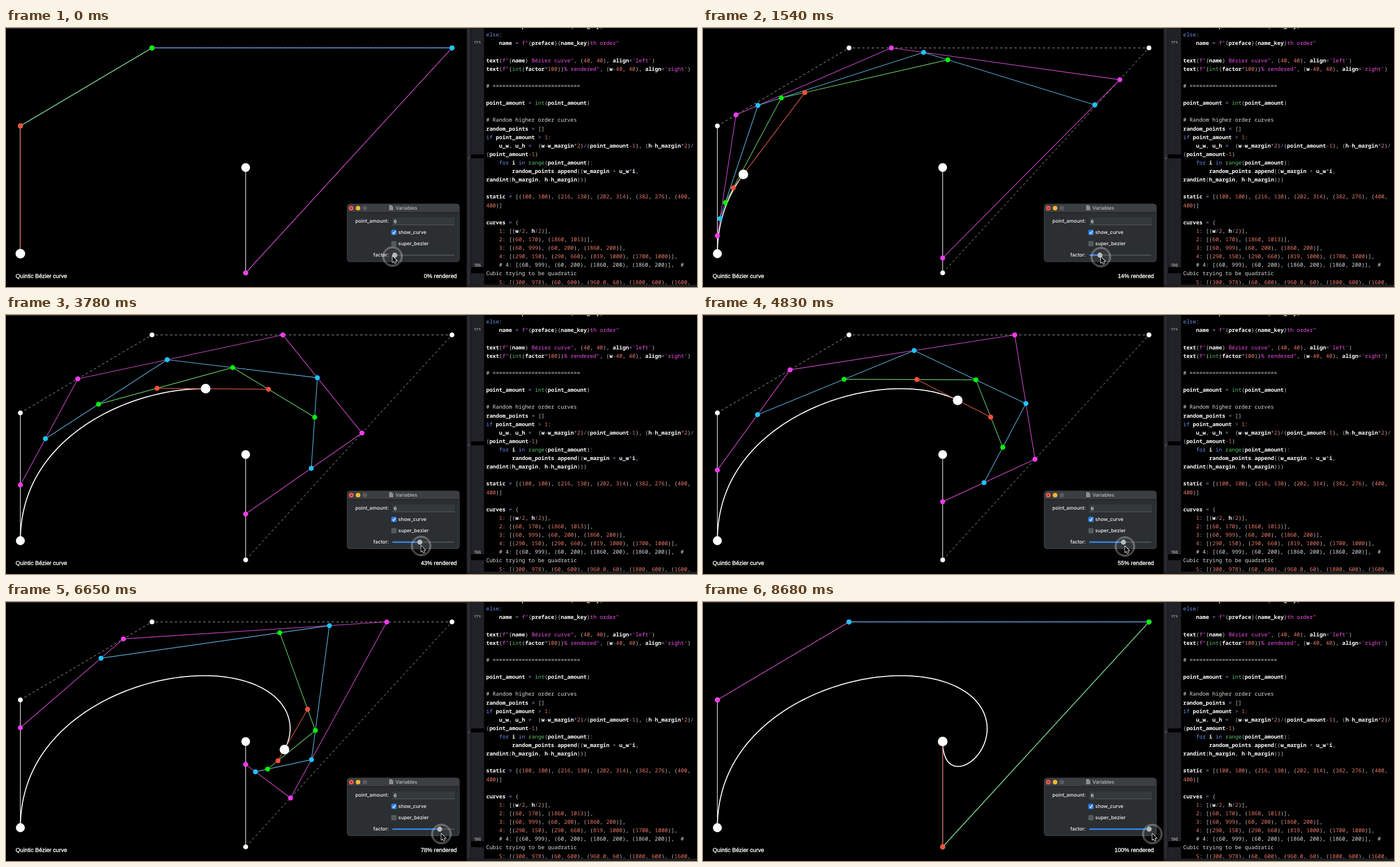
Animation, 1221 px wide and 459 px high, one loop 8.75 s. Source, as an HTML page with a canvas:

```html
<!DOCTYPE html>
<html lang="en">
<head>
<meta charset="utf-8">
<title>Bézier construction</title>
<style>
html, body { margin: 0; width: 100%; height: 100%; overflow: hidden; background: #000; }
canvas { display: block; width: 1221px; height: 459px; }
</style>
</head>
<body>
<canvas id="stage" width="1221" height="459"></canvas>
<script>
const ctx = document.getElementById('stage').getContext('2d');
const LOOP = 8750, STEP = 70;
const SANS = '"Liberation Sans", Arial, sans-serif';
const UI = 'Inter, sans-serif';
const MONO = '"Noto Sans Mono", "DejaVu Sans Mono", monospace';

// Control points and the colours of each construction level
const points = [[25.4, 400], [25.4, 173.5], [258, 35.3], [788, 35.3], [423.5, 434], [423.5, 247.3]];
const levels = [
  { dots: '#f23cee', lines: '#d24ad0' },
  { dots: '#1cc4ff', lines: '#5db4e2' },
  { dots: '#04f304', lines: '#68d068' },
  { dots: '#fb4f3c', lines: '#dc5a4e' }
];

// Pointer path: time, x, y
const pointerKeys = [
  [0, 683, 405], [1540, 703, 406], [2450, 716.9, 407.8], [3780, 733.5, 409.3],
  [5880, 758.05, 411], [7490, 781.6, 411.2], [8680, 794, 411.2]
];

const code = `    name = preface + order[name_key]
else:
    name = f"{preface}{name_key}th order"

text(f"{name} Bézier curve", (40, 40), align='left')
text(f"{int(factor*100)}% rendered", (w-40, 40), align='right')

# ${'='.repeat(27)}

point_amount = int(point_amount)

# Random higher order curves
random_points = []
if point_amount > 1:
    u_w, u_h =  (w-w_margin*2)/(point_amount-1), (h-h_margin*2)/
(point_amount-1)
    for i in range(point_amount):
        random_points.append((w_margin + u_w*i,
randint(h_margin, h-h_margin)))

static = [(100, 100), (216, 130), (202, 314), (382, 276), (400,
400)]

curves = {
    1: [(w/2, h/2)],
    2: [(60, 170), (1860, 1013)],
    3: [(60, 999), (60, 200), (1860, 200)],
    4: [(290, 150), (290, 660), (819, 1000), (1700, 1000)],
    # 4: [(60, 999), (60, 200), (1860, 200), (1860, 200)],  #
Cubic trying to be quadratic
    5: [(300, 978), (60, 600), (960.0, 60), (1800, 600), (1600,`.split('\n');

const ink = {
  comment: '#dcdcdc', string: '#f050ea', number: '#ea7a68', keyword: '#6f92ee',
  builtin: '#5fbf6b', name: '#ffffff', mark: '#c8c2c2', operator: '#8b93c8'
};

function tokenize(text) {
  const pattern = /(#.*)|(f?"[^"]*"|'[^']*')|(\d[\d.]*)|\b(else|if|for|in)\b|\b(int|range)\b|([a-z_]\w*)|([=+*\/<>-])|(\s+|.)/gi;
  const kinds = ['comment', 'string', 'number', 'keyword', 'builtin', 'name', 'operator', 'mark'];
  return [...text.matchAll(pattern)].flatMap(match => {
    const kind = kinds[match.slice(1).findIndex(group => group !== undefined)];
    if (kind !== 'string') return [[match[0], kind]];
    return match[0].split(/(\{[^}]*\})/).flatMap((part, i) => i % 2 ? tokenize(part) : [[part, kind]]);
  });
}

const codeRows = code.map((row, i) =>
  i && code[i - 1].endsWith('#') ? [[row, 'comment']] : tokenize(row));

function pointerAt(time, axis) {
  const k = pointerKeys, last = k.length - 1;
  const slope = i => {
    const a = k[Math.max(i - 1, 0)], b = k[Math.min(i + 1, last)];
    return (b[axis] - a[axis]) / (b[0] - a[0]);
  };
  let i = 0;
  while (i < last - 1 && time > k[i + 1][0]) i++;
  const span = k[i + 1][0] - k[i][0];
  const u = Math.min((time - k[i][0]) / span, 1), v = 1 - u;
  return v * v * (1 + 2 * u) * k[i][axis] + u * u * (3 - 2 * u) * k[i + 1][axis]
    + u * v * span * (v * slope(i) - u * slope(i + 1));
}

const between = (a, b, t) => [a[0] + (b[0] - a[0]) * t, a[1] + (b[1] - a[1]) * t];
const reduce = (pts, t) => pts.slice(1).map((p, i) => between(pts[i], p, t));

function curvePoint(t) {
  let pts = points;
  while (pts.length > 1) pts = reduce(pts, t);
  return pts[0];
}

function line(pts, color, width) {
  ctx.beginPath();
  pts.forEach(p => ctx.lineTo(...p));
  ctx.strokeStyle = color;
  ctx.lineWidth = width;
  ctx.stroke();
}

function dot([x, y], radius, color) {
  ctx.beginPath();
  ctx.arc(x, y, radius, 0, Math.PI * 2);
  ctx.fillStyle = color;
  ctx.fill();
}

function rect(x, y, w, h, color, radius = 0) {
  ctx.beginPath();
  ctx.roundRect(x, y, w, h, radius);
  ctx.fillStyle = color;
  ctx.fill();
}

function label(text, x, y, font, color, align = 'left') {
  ctx.font = font;
  ctx.fillStyle = color;
  ctx.textAlign = align;
  ctx.fillText(text, x, y);
}

// Slightly heavier text for the captions below the drawing
function caption(text, x, align) {
  label(text, x, 442.6, '10.16px ' + SANS, '#fff', align);
  ctx.strokeStyle = '#fff';
  ctx.lineWidth = 0.35;
  ctx.strokeText(text, x, 442.6);
}

function drawConstruction(factor) {
  rect(0, 0, 814, 1.6, '#343434');
  ctx.lineJoin = 'round';
  ctx.setLineDash([4.2, 4.2]);
  line(points.slice(1, 5), 'rgba(255,255,255,.68)', 0.95);
  ctx.setLineDash([]);
  line(points.slice(0, 2), '#dedede', 1.25);
  line(points.slice(4), '#dedede', 1.25);
  points.slice(1, 5).forEach(p => dot(p, 4.3, '#fff'));
  dot(points[0], 7.9, '#fff');
  dot(points[5], 7.7, '#fff');

  const steps = Math.ceil(factor * 120);
  if (steps) {
    const trail = Array.from({ length: steps + 1 }, (_, i) => curvePoint(factor * i / steps));
    line(trail, '#fff', 1.75);
  }

  let pts = points;
  for (const { dots, lines } of levels) {
    pts = reduce(pts, factor);
    line(pts, lines, 1.15);
    pts.forEach(p => dot(p, 4.4, dots));
  }
  dot(curvePoint(factor), 8.5, '#fff');

  caption('Quintic Bézier curve', 17, 'left');
  caption(Math.floor(factor * 100) + '% rendered', 796.7, 'right');
}

function drawEditor() {
  rect(813.5, 0, 31, 459, '#17181b');
  rect(815, 0, 5.5, 459, '#292b30');
  rect(822, 0, 22.5, 459, '#202227');
  rect(822, 224, 22.5, 7, '#000');
  rect(822, 424, 22.5, 10.5, '#000');
  label('»', 815.5, 232.5, '8px ' + SANS, '#6b6d72');

  const numberFont = '7.6px ' + UI;
  ctx.save();
  ctx.beginPath();
  ctx.rect(822, 23, 22, 4.5);
  ctx.rect(822, 400, 22, 24);
  ctx.clip();
  label('173', 827, 28.8, numberFont, '#c4c4c4');
  label('196', 827, 422.8, numberFont, '#c4c4c4');
  ctx.restore();

  ctx.save();
  ctx.beginPath();
  ctx.rect(845, 0, 376, 454.5);
  ctx.clip();
  const pitch = 5.735;
  codeRows.forEach((row, i) => {
    let column = 0;
    for (const [text, kind] of row) {
      const weight = kind === 'name' ? 600 : 450;
      label(text, 848.4 + column * pitch, 0.2 + i * 15.11, `${weight} 9.56px ${MONO}`, ink[kind]);
      column += text.length;
    }
  });
  ctx.restore();
  rect(815, 454.8, 406, 4.2, '#1d1f23');
}

function drawPanel(factor) {
  ctx.save();
  ctx.shadowColor = 'rgba(0,0,0,.6)';
  ctx.shadowBlur = 10;
  rect(602.5, 311.5, 199, 103, '#54585a', 5.5);
  ctx.restore();
  rect(603.2, 312.2, 197.6, 101.6, '#2b2f32', 5);
  rect(603.2, 312.2, 197.6, 14.6, '#3b3f42', [5, 5, 0, 0]);
  rect(603.2, 326.6, 197.6, 0.8, '#1b1d1f');
  ['#fb5c55', '#f8b830', '#575b5e'].forEach((color, i) => dot([610.1 + i * 12, 319.3], 4, color));
  dot([610.1, 319.3], 1.4, '#8c1a14');

  ctx.beginPath();
  [[677, 314], [681.5, 314], [684.3, 317], [684.3, 323], [677, 323]].forEach(p => ctx.lineTo(...p));
  ctx.fillStyle = '#8b8f91';
  ctx.fill();

  const font = '500 8.7px ' + UI;
  const text = '#f2f3f3';
  label('Variables', 688.2, 322, font, '#b9bcbe');
  label('point_amount:', 676.3, 345, font, text, 'right');
  label('factor:', 676.3, 405, font, text, 'right');
  rect(682.5, 336, 110.5, 13, '#343a3c');
  rect(682.5, 348.4, 110.5, 0.8, '#63686a');
  label('6', 685, 345.8, font, text);

  rect(680.8, 357.4, 9.4, 9.6, '#2d7ee4', 2);
  line([[683.2, 362.4], [685, 364.6], [688, 359.6]], '#fff', 1.3);
  rect(680.8, 377.4, 9.4, 9.6, '#54595c', 2);
  label('show_curve', 693, 365.2, font, text);
  label('super_bezier', 693, 385.2, font, text);

  const knob = 687 + 101.3 * factor;
  rect(682.5, 401.3, 110, 2.4, '#474d50', 1.2);
  rect(682.5, 401.2, knob - 682.5, 2.6, '#3284ea', 1.2);
  dot([knob, 402.6], 4.5, '#b3b7b9');
}

function drawPointer(x, y) {
  dot([x, y], 17, 'rgba(255,255,255,.04)');
  for (const radius of [17.4, 15.6]) {
    ctx.beginPath();
    ctx.arc(x, y, radius, 0, Math.PI * 2);
    ctx.strokeStyle = 'rgba(230,230,230,.75)';
    ctx.lineWidth = 0.8;
    ctx.stroke();
  }
  const arrow = [[0, 0], [0, 11], [2.5, 8.7], [4.2, 12.6], [6, 11.8], [4.4, 8], [7.8, 8]];
  ctx.beginPath();
  arrow.forEach(([dx, dy]) => ctx.lineTo(x + dx, y - 0.6 + dy));
  ctx.closePath();
  ctx.strokeStyle = '#fff';
  ctx.lineWidth = 1.6;
  ctx.stroke();
  ctx.fillStyle = '#000';
  ctx.fill();
}

function draw(time) {
  const x = pointerAt(time, 1), y = pointerAt(time, 2);
  const factor = Math.min(Math.max((x - 688.4) / 103.4, 0), 1);
  rect(0, 0, 1221, 459, '#000');
  drawConstruction(factor);
  drawEditor();
  drawPanel(factor);
  drawPointer(x, y);
}

ctx.textRendering = 'geometricPrecision';
let start;
function tick(now) {
  start ??= now;
  draw(Math.floor(Math.max(now - start, 0) % LOOP / STEP) * STEP);
  requestAnimationFrame(tick);
}
draw(0);
requestAnimationFrame(tick);
</script>
</body>
</html>
```
